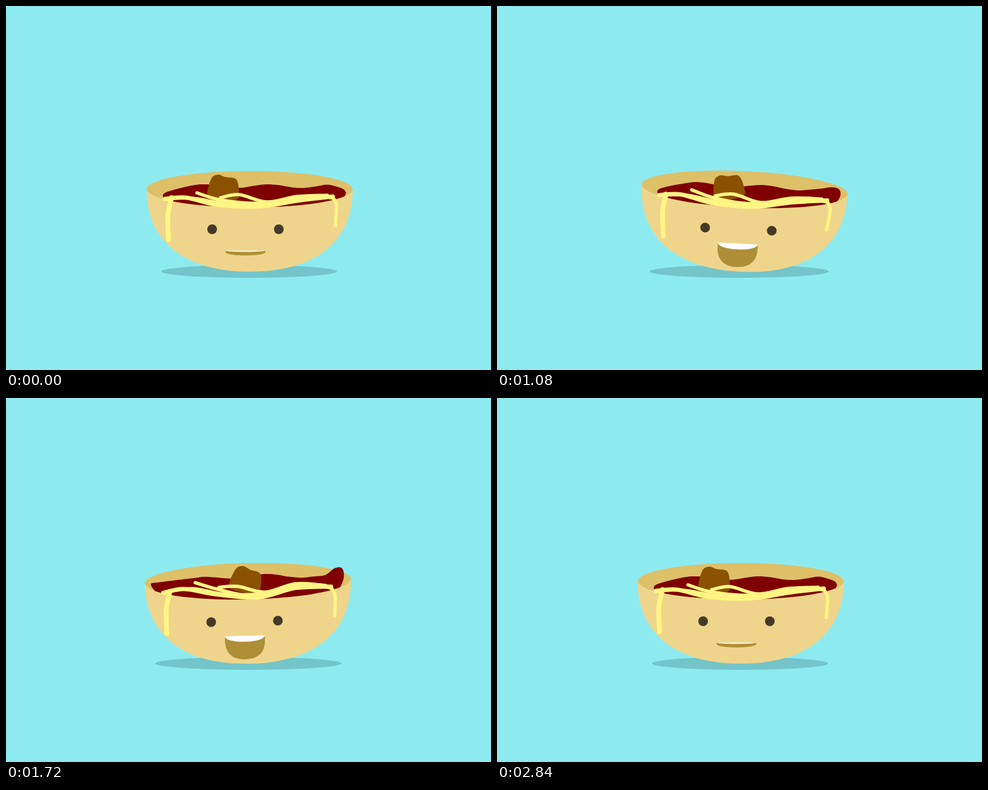
An HTML page for the animation above (2.88 s loop, 800 by 600 pixels).

```html
<!DOCTYPE html>
<html lang="en">
<head>
<meta charset="utf-8">
<title>Rocking bowl</title>
<style>
  html, body { margin: 0; width: 100%; height: 100%; overflow: hidden; background: #8debf0; }
  svg { display: block; width: 800px; height: 600px; }
  .noodle { fill: none; stroke: #fff583; stroke-linecap: round; stroke-linejoin: round; }
</style>
</head>
<body>
<svg viewBox="0 0 800 600">
  <ellipse id="shadow" cy="437.5" ry="10.5" fill="#73c5c9"/>
  <g id="bowl">
    <ellipse cx="402" cy="302" rx="170" ry="30" fill="#dec069"/>
    <path id="soup" fill="#7f0000"/>
    <path id="meat" fill="#8a5200"/>
    <path d="M232 302 C232 388 294 438 402 438 S572 388 572 302 A170 30 0 0 1 232 302Z" fill="#efd58b"/>
    <g id="noodles"></g>
    <ellipse class="eye" cx="340" cy="368" rx="8" fill="#453a28"/>
    <ellipse class="eye" cx="450" cy="368" rx="8" fill="#453a28"/>
    <g id="mouth">
      <path d="M362 391.5 V399 C362 420 374 430.5 395 430.5 S428 420 428 399 V391.5Z" fill="#ae8f38"/>
      <path d="M362 391.5 C362 398 378 401.5 395 401.5 S428 398 428 391.5Z" fill="#fff"/>
    </g>
  </g>
</svg>
<script>
const LOOP = 2880, STEP = 40, REST_X = 358;
const $ = id => document.getElementById(id);

// Turning points of the rocking: it swells, then dies away
const rock = [[320, 0], [765, -4.5], [1017, 5.9], [1224, -9.3], [1434, 12.15], [1616, -8.3],
  [1826, 6], [2046, -4.5], [2250, 3.4], [2450, -2.2], [2650, 1.2], [2840, 0]];

const meat = [-26,9, -19,-16, -8,-22, 4,-18, 22,-14, 26,9, 20,20, -20,19];

const strands = [
  { width: 7, base: [262,318, 298,316, 350,328, 420,330, 480,321, 539,314] },
  { width: 5, base: [262,318, 310,317, 365,326, 430,325, 500,313, 540,317] },
  { width: 5.5, base: [315,308, 350,319, 400,325, 450,324, 500,316] },
  { width: 5.5, base: [354,316, 385,311, 430,323, 480,314, 530,312] }
];

const ease = u => (1 - Math.cos(Math.PI * Math.max(0, Math.min(1, u)))) / 2;
const ramp = (t, from, to) => ease((t - from) / (to - from));
const hump = (t, mid, width) => Math.exp(-(((t - mid) / width) ** 2));

function tiltAt(t) {
  let value = 0;
  for (let i = 1; i < rock.length; i++) {
    const [t0, a] = rock[i - 1], [t1, b] = rock[i];
    value += (b - a) * ramp(t, t0, t1);
  }
  return value;
}

// Smooth path through x, y pairs
function curve(nums, closed) {
  const n = nums.length / 2;
  const p = i => {
    const k = closed ? (i + n) % n : Math.max(0, Math.min(n - 1, i));
    return [nums[2 * k], nums[2 * k + 1]];
  };
  const f = v => v.toFixed(2);
  let d = `M${f(nums[0])} ${f(nums[1])}`;
  for (let i = 0; i < (closed ? n : n - 1); i++) {
    const [a, b, c, e] = [p(i - 1), p(i), p(i + 1), p(i + 2)];
    d += `C${f(b[0] + (c[0] - a[0]) / 6)} ${f(b[1] + (c[1] - a[1]) / 6)} `
      + `${f(c[0] - (e[0] - b[0]) / 6)} ${f(c[1] - (e[1] - b[1]) / 6)} ${f(c[0])} ${f(c[1])}`;
  }
  return d + (closed ? 'Z' : '');
}

// Rippled surface; the left end spreads and the right end splashes up
function soupPath(spread, surge) {
  const up = 27 * Math.sqrt(surge), left = 259 - spread;
  const pts = [263 - spread * 0.5, 322, left, 311 - spread * 0.4, left + 14, 304 - spread * 0.2];
  for (let x = 310; x <= 530; x += 20) {
    const swell = 6 * surge * Math.sin(Math.PI * (x - 310) / 220);
    pts.push(x, 297 - 3 * Math.cos(2 * Math.PI * (x - 433) / 107) - swell);
  }
  pts.push(546, 298 - up * 0.7, 558, 303 - up * 0.9, 560, 311 - up * 0.5, 550, 323);
  return `${curve(pts)}Q402 352 ${pts[0]} ${pts[1]}Z`;
}

function strandPath(base, surge) {
  return curve(base.map((v, i) => {
    if (i % 2 === 0) return v;
    const u = (base[i - 1] - 262) / 278;
    return v - 11 * surge * Math.sin(2 * Math.PI * u) ** 2;
  }));
}

function addNoodle(width) {
  const el = document.createElementNS('http://www.w3.org/2000/svg', 'path');
  el.setAttribute('class', 'noodle');
  el.setAttribute('stroke-width', width);
  return $('noodles').appendChild(el);
}

const hangLeft = addNoodle(8), hangRight = addNoodle(5.5);
strands.forEach(s => { s.el = addNoodle(s.width); });
$('meat').setAttribute('d', curve(meat, true));
const eyes = document.querySelectorAll('.eye');

function draw(t) {
  const tilt = tiltAt(t);
  const surge = hump(t, 1510, 290);
  const active = ramp(t, 320, 1100) - ramp(t, 2300, 2840);
  const open = ramp(t, 320, 560) - ramp(t, 2560, 2800);
  const blink = 1 - 0.9 * (ramp(t, 0, 80) - ramp(t, 80, 160));

  $('shadow').setAttribute('cx', 401 + 1.5 * tilt - 7 * active + 13 * surge);
  $('shadow').setAttribute('rx', 145 + 9 * hump(t, 1700, 600));
  $('bowl').setAttribute('transform', `translate(0 ${0.008 * tilt * tilt}) rotate(${tilt} 402 438)`);
  $('mouth').setAttribute('transform', `translate(0 406.3) scale(1 ${0.2 + 0.8 * open}) translate(0 -406.3)`);
  eyes.forEach(e => e.setAttribute('ry', 8 * blink));

  $('soup').setAttribute('d', soupPath(21 * hump(t, 1900, 400), surge));
  const slide = 3 * tilt + 75 * surge, spin = 55 * surge - 22 * active;
  $('meat').setAttribute('transform', `translate(${REST_X + slide} 300) rotate(${spin})`);

  const swing = tilt + 0.16 * tilt * Math.abs(tilt);
  hangLeft.setAttribute('d', curve([273,316, 267 + swing * 0.4,345, 268 + swing,385]));
  hangRight.setAttribute('d', curve([538,315, 545 - swing * 0.1,328, 543 - swing * 0.65,362]));
  strands.forEach(s => s.el.setAttribute('d', strandPath(s.base, surge)));
}

const start = performance.now();
function frame() {
  const t = (performance.now() - start) % LOOP;
  draw(Math.floor(t / STEP) * STEP);
  requestAnimationFrame(frame);
}
frame();
</script>
</body>
</html>
```
